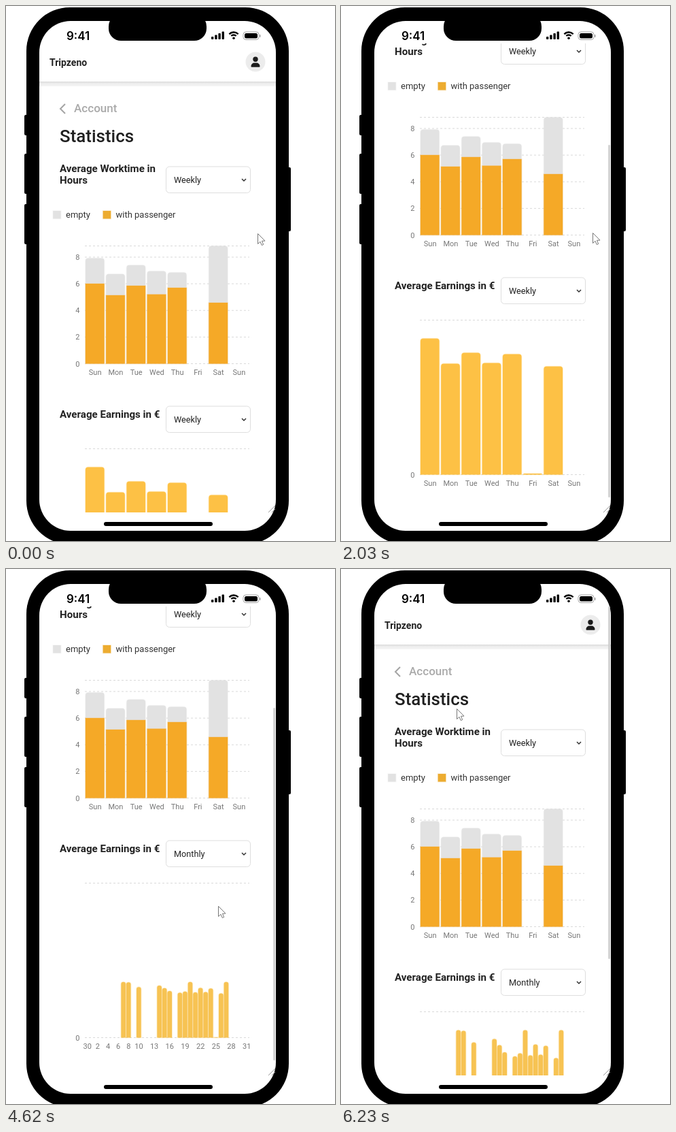
Write an HTML page with a canvas that moves like this. It is 484x786 px and loops after 6.3 s.

```html
<!DOCTYPE html>
<html lang="en">
<head>
<meta charset="utf-8">
<title>Statistics</title>
<style>
html, body { margin: 0; width: 100%; height: 100%; overflow: hidden; background: #fff; }
canvas { display: block; }
</style>
</head>
<body>
<canvas id="stage" width="484" height="786"></canvas>
<script>
const ctx = document.getElementById('stage').getContext('2d');
const LOOP = 6300, STEP = 70;
const OPEN = 3500, HOVER = 4060, SELECT = 4245, GROW = 1500;
const SCROLL_MAX = 189, HOUR = 19.57;
const PLOT = { left: 116, right: 358 };
const DAYS = ['Sun', 'Mon', 'Tue', 'Wed', 'Thu', 'Fri', 'Sat', 'Sun'];
const BUSY_HOURS = [6, 5.13, 5.85, 5.2, 5.7, 0, 4.57];
const EMPTY_HOURS = [1.92, 1.6, 1.55, 1.75, 1.15, 0, 4.27];
const WEEK_EARNINGS = [200, 163, 179, 164, 177, 1.5, 159];
const FIRST_DAY = 7, WEEK_START = 20, LAST_DAY = 27, DAYS_OFF = [9, 11, 12, 13, 17];

// Pointer waypoints: time, x, y.
const POINTER = [[0, 370, 334], [2100, 370, 333], [2730, 354, 412],
  [SELECT, 312, 495], [4620, 312, 495], [5180, 372, 450], [5800, 361, 429], [6230, 170, 205]];

const smooth = p => p * p * (3 - 2 * p);
const ramp = (t, from, to) => smooth(Math.min(1, Math.max(0, (t - from) / (to - from))));
const scrollAt = t => SCROLL_MAX * (ramp(t, 1750, 2030) - ramp(t, 5670, 6110));

function pointerAt(t) {
  const i = POINTER.findIndex(p => p[0] > t);
  if (i < 0) return POINTER.at(-1).slice(1);
  const [start, x, y] = POINTER[i - 1], [end, toX, toY] = POINTER[i];
  const k = ramp(t, start, end);
  return [x + (toX - x) * k, y + (toY - y) * k];
}

// Same curve as the CSS "ease" keyword.
function ease(p) {
  if (p >= 1) return 1;
  const bezier = (u, a, b) => 3 * u * (1 - u) ** 2 * a + 3 * u * u * (1 - u) * b + u ** 3;
  let lo = 0, hi = 1;
  for (let i = 0; i < 24; i++) {
    const mid = (lo + hi) / 2;
    if (bezier(mid, .25, .25) < p) lo = mid; else hi = mid;
  }
  return bezier(lo, .1, 1);
}

// Earlier days decline with a weekly rhythm; the last week repeats the weekly chart.
function earningsOn(day) {
  if (DAYS_OFF.includes(day)) return 0;
  if (day >= WEEK_START) return WEEK_EARNINGS[(day - WEEK_START) % 7];
  const rhythm = 9 * Math.cos(2 * Math.PI * (day - 13.5) / 7);
  return Math.min(200, 200 - 3 * (day - FIRST_DAY) + rhythm);
}

function box(x, y, w, h, r, fill, stroke, width = 1) {
  ctx.beginPath();
  ctx.roundRect(x, y, w, h, r);
  if (fill) { ctx.fillStyle = fill; ctx.fill(); }
  if (stroke) { ctx.strokeStyle = stroke; ctx.lineWidth = width; ctx.stroke(); }
}

function circle(x, y, r, fill) {
  ctx.beginPath();
  ctx.arc(x, y, r, 0, 7);
  ctx.fillStyle = fill;
  ctx.fill();
}

function line(points, color, width, dash = []) {
  ctx.beginPath();
  points.forEach(p => ctx.lineTo(...p));
  ctx.setLineDash(dash);
  ctx.strokeStyle = color;
  ctx.lineWidth = width;
  ctx.stroke();
  ctx.setLineDash([]);
}

function text(str, x, y, size, weight = 400, color = '#222', align = 'left', family = 'Roboto') {
  ctx.font = `${weight} ${size}px ${family}, sans-serif`;
  ctx.textAlign = align;
  ctx.fillStyle = color;
  ctx.fillText(str, x, y);
}

// A bar has a soft pale rim in its own colour.
function bar(x, base, w, h, r, color) {
  if (h <= 0) return;
  const corner = Math.min(r, h);
  box(x, base - h, w, h, [corner, corner, 0, 0], color);
  ctx.globalAlpha = .25;
  ctx.strokeStyle = color;
  ctx.lineWidth = 1.6;
  ctx.stroke();
  ctx.globalAlpha = 1;
}

function gridLine(y) {
  line([[PLOT.left, y], [PLOT.right, y]], '#d9d9d9', 1, [3, 3]);
}

function axisLabel(str, x, y, align = 'center') {
  text(str, x, y, 11, 400, '#777', align);
}

function select(value, y) {
  box(235.5, y, 124, 38.5, 5, '#fff', '#dedede');
  text(value, 247, y + 24, 12.7);
  line([[347, y + 18], [350, y + 21], [353, y + 18]], '#333', 1.5);
}

const slotX = (i, count) => PLOT.left + (PLOT.right - PLOT.left) / count * i;

function weekBars(values, base, radius, color) {
  values.forEach((h, i) => bar(slotX(i, 8) + .9, base, 27.7, h, radius, color));
}

function weekLabels(y) {
  DAYS.forEach((day, i) => axisLabel(day, slotX(i + .5, 8), y));
}

function legend(label, x, color) {
  bar(x, 312.5, 11.5, 11.5, 0, color);
  text(label, x + 18.8, 311, 13, 400, '#333');
}

function drawHeader() {
  text('Tripzeno', 64, 88, 14, 700);
  circle(367, 82, 14.5, '#ececec');
  circle(367, 78.3, 3.7, '#1c1c1c');
  box(360.5, 83.5, 13, 6.2, [5, 5, 1, 1], '#1c1c1c');
  const shade = ctx.createLinearGradient(0, 111, 0, 118);
  shade.addColorStop(0, '#dadada');
  shade.addColorStop(.4, '#ededed');
  shade.addColorStop(1, '#f5f5f5');
  ctx.fillStyle = shade;
  ctx.fillRect(49, 111, 348, 7);
  line([[87, 144], [80, 151], [87, 158]], '#a5a5a5', 2);
  text('Account', 100, 156, 17, 500, '#aaa');
  text('Statistics', 79, 199.5, 25.9, 500, '#1f1f1f');
}

function drawWorktime() {
  const base = 525.5;
  text('Average Worktime in', 79, 244, 15.1, 700);
  text('Hours', 79, 261, 15.1, 700);
  select('Weekly', 236);
  legend('empty', 69.2, '#e2e2e2');
  legend('with passenger', 142.7, '#edac30');
  for (let hours = 0; hours <= 8; hours += 2) {
    const y = base - hours * HOUR;
    gridLine(y);
    axisLabel(hours, 108.5, y + 4, 'right');
  }
  gridLine(352.5);
  weekBars(BUSY_HOURS.map((h, i) => (h + EMPTY_HOURS[i]) * HOUR), base, 4, '#e2e2e2');
  weekBars(BUSY_HOURS.map(h => h * HOUR), base, 0, '#f5a927');
  weekLabels(541.5);
}

function drawEarnings(t) {
  const base = 877.5, monthly = t >= SELECT;
  text('Average Earnings in €', 79, 604.5, 15.1, 700);
  select(monthly ? 'Monthly' : 'Weekly', 588);
  gridLine(650.5);
  gridLine(base);
  axisLabel(0, 108.5, base + 4, 'right');
  if (!monthly) {
    weekBars(WEEK_EARNINGS, base, 4, '#fdc145');
    weekLabels(893.5);
    return;
  }
  const grown = ease((t - SELECT) / GROW);
  for (let day = FIRST_DAY; day <= LAST_DAY; day++)
    bar(slotX(day, 32) + .4, base, 6.7, earningsOn(day) * grown, 3.3, '#f7c353');
  for (let day = 0; day <= 31; day += day < 10 ? 2 : 3)
    axisLabel(day || 30, slotX(day + .5, 32), 893.5);
}

function drawMenu(t) {
  box(236, 437, 123, 83.5, 4, '#fff', '#b9b9bd', 1.5);
  box(240, t >= HOVER ? 479 : 441.5, 115, 37, 3, '#e3e2e9');
  text('Weekly', 245.5, 465, 12.7);
  text('Monthly', 245.5, 503, 12.7);
}

function drawPhone() {
  box(30, 2, 386, 789, 64, '#000');
  box(27, 160, 8, 30, 2, '#000');
  box(27, 217, 8, 59, 2, '#000');
  box(27, 291, 8, 59, 2, '#000');
  box(411, 237, 8, 94, 2, '#000');
  box(49, 22, 348, 749, 46, '#fff');
}

function drawStatus() {
  box(151, 12, 144, 39, 18, '#000');
  text('9:41', 89, 50, 17, 600, '#000', 'left', 'Inter');
  for (let i = 0; i < 4; i++) {
    const h = 4 + i * 2.5;
    box(302 + i * 5.2, 49 - h, 3.4, h, 1, '#000');
  }
  circle(335, 47.3, 1.8, '#000');
  for (const r of [5, 9]) {
    ctx.beginPath();
    ctx.arc(335, 47.5, r, -Math.PI * .76, -Math.PI * .24);
    ctx.strokeStyle = '#000';
    ctx.lineWidth = 2.3;
    ctx.stroke();
  }
  box(349, 38, 23, 11.5, 4, '#fff', '#a5a5a5');
  box(351, 40, 19, 7.5, 2.5, '#000');
  box(373, 42, 1.5, 4, 1, '#a5a5a5');
  box(144, 758, 160, 6, 3, '#000');
  for (const size of [5, 10])
    line([[396 - size, 744], [396, 744 - size]], '#999', 1);
}

function drawPointer(x, y) {
  ctx.save();
  ctx.translate(x + .5, y + .5);
  ctx.beginPath();
  [[0, 0], [0, 15], [3.5, 11.8], [5.8, 17], [8.2, 16], [6, 10.8], [10.5, 10.6]]
    .forEach(p => ctx.lineTo(...p));
  ctx.closePath();
  ctx.fillStyle = '#fff';
  ctx.fill();
  ctx.strokeStyle = '#777';
  ctx.lineWidth = 1;
  ctx.stroke();
  ctx.restore();
}

function draw(t) {
  const scroll = scrollAt(t);
  ctx.fillStyle = '#fff';
  ctx.fillRect(0, 0, 484, 786);
  drawPhone();

  ctx.save();
  ctx.beginPath();
  ctx.rect(49, 55, 348, 689);
  ctx.clip();
  ctx.translate(0, -scroll);
  drawHeader();
  drawWorktime();
  drawEarnings(t);
  ctx.restore();

  if (t > 1750) box(393.3, 55 + scroll * .788, 2.6, 518, 1.3, '#cbcbcb');
  drawStatus();
  if (t >= OPEN && t < SELECT) drawMenu(t);
  else drawPointer(...pointerAt(t));
}

function tick(now) {
  draw(Math.floor(now % LOOP / STEP) * STEP);
  requestAnimationFrame(tick);
}
requestAnimationFrame(tick);
</script>
</body>
</html>
```
